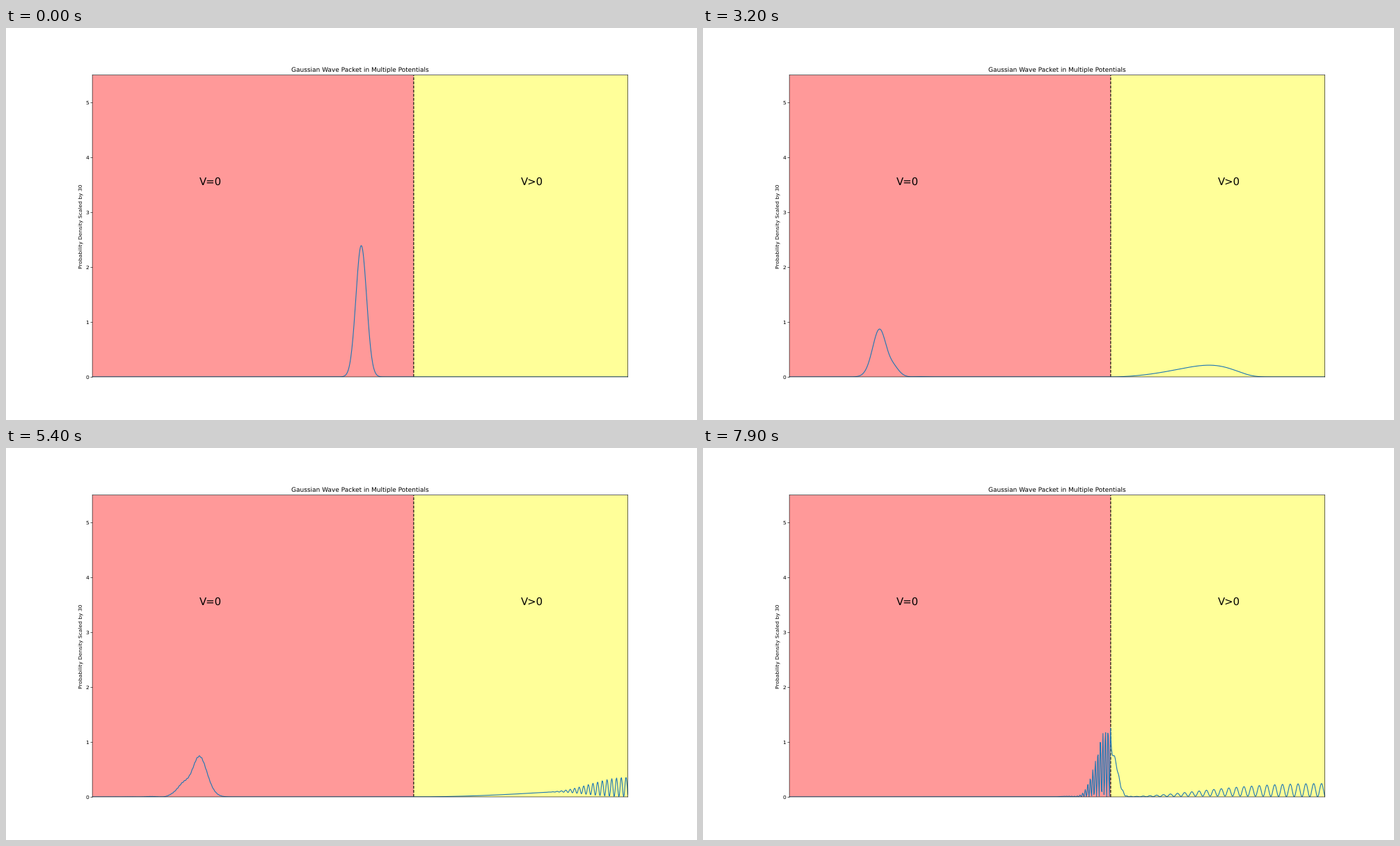
Recreate the animation shown at these times as a matplotlib script. Size 993x564 px, loop 8 s.

```python
import numpy as np
import matplotlib.pyplot as plt
from matplotlib.animation import FuncAnimation

W, H, DPI = 993, 564, 53.7
FRAMES, INTERVAL = 80, 100

# Wave packet and potential step (hbar = m = 1)
LENGTH, POINTS = 500.0, 1000
X0, SIGMA, ENERGY = 250.0, 5.0, 1.0
K0 = np.sqrt(2 * ENERGY)
STEP_X, STEP_V = 300.0, 0.9
DT, STEPS_PER_FRAME = 1.0, 8
SCALE = 30


def crank_nicolson(x, potential):
    """Matrix that advances the wave function by one time step."""
    dx = x[1] - x[0]
    n = len(x)
    hop = np.full(n - 1, -0.5 / dx**2)
    ham = np.diag(1 / dx**2 + potential) + np.diag(hop, 1) + np.diag(hop, -1)
    half = 0.5j * DT * ham
    return np.linalg.solve(np.eye(n) + half, np.eye(n) - half)


def simulate(x):
    """Scaled probability density for every frame."""
    psi = np.exp(-(x - X0) ** 2 / (4 * SIGMA**2) + 1j * K0 * x)
    psi /= (2 * np.pi * SIGMA**2) ** 0.25
    step = crank_nicolson(x, np.where(x >= STEP_X, STEP_V, 0.0))
    jump = np.linalg.matrix_power(step, STEPS_PER_FRAME)
    psi = step @ psi
    density = []
    for _ in range(FRAMES):
        density.append(SCALE * np.abs(psi) ** 2)
        psi = jump @ psi
    return density


x = np.linspace(0, LENGTH, POINTS)
density = simulate(x)

plt.rcParams.update({
    "font.family": "DejaVu Sans",
    "text.hinting": "none",
    "path.snap": False,
})
# The small surplus keeps rounding from losing a pixel
fig, ax = plt.subplots(figsize=((W + 0.01) / DPI, (H + 0.01) / DPI), dpi=DPI)
ax.set_xlim(0, LENGTH)
ax.set_ylim(0, 5.5)
ax.set_xticks([])
ax.set_title("Gaussian Wave Packet in Multiple Potentials")
ax.set_ylabel(f"Probability Density Scaled by {SCALE}")
ax.axvspan(0, STEP_X, color="red", alpha=0.4, lw=0)
ax.axvspan(STEP_X, LENGTH, color="yellow", alpha=0.4, lw=0)
ax.axvline(STEP_X, color="black", ls="--", lw=1.5)
ax.text(0.2 * LENGTH, 3.5, "V=0", fontsize=20)
ax.text(0.8 * LENGTH, 3.5, "V>0", fontsize=20)
line, = ax.plot(x, density[0], color="tab:blue", lw=1.5)


def update(i):
    line.set_ydata(density[i])
    return (line,)


anim = FuncAnimation(fig, update, frames=FRAMES, interval=INTERVAL, repeat=True)
plt.show()
```
